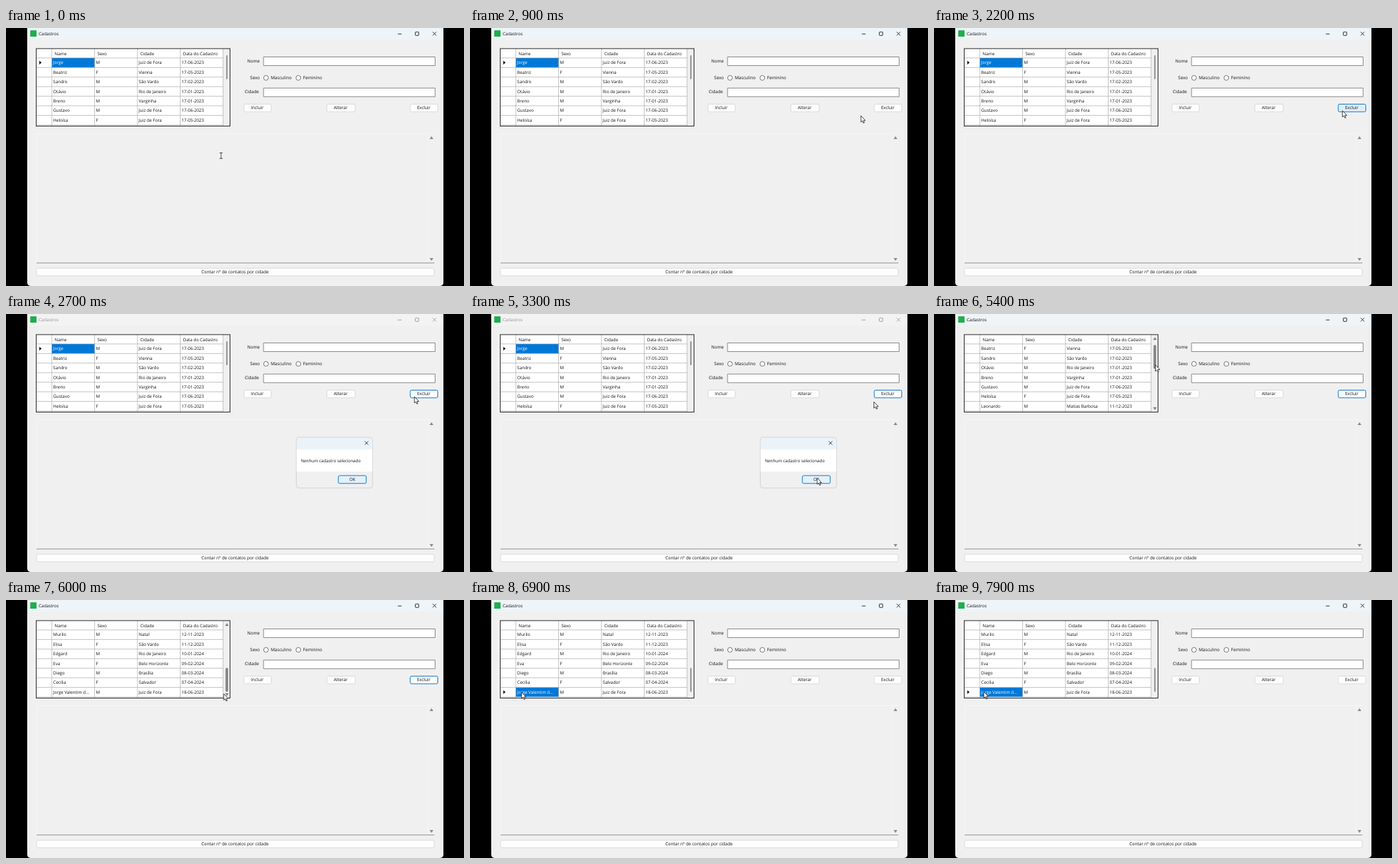
Recreate the animation shown at these times as an HTML page with a canvas. Size 690x388 px, loop 8000 ms.

```html
<!DOCTYPE html>
<html lang="pt">
<head>
<meta charset="utf-8">
<title>Cadastros</title>
<style>
html, body { margin: 0; width: 100%; height: 100%; overflow: hidden; background: #000; }
canvas { display: block; }
</style>
</head>
<body>
<canvas id="stage" width="690" height="388"></canvas>
<script>
const ctx = document.getElementById('stage').getContext('2d');
const LOOP = 8000, STEP = 100;
const FACE = '#f0f0f0', BLUE = '#0078d4', INK = '#111';
const ROW_H = 14.4, VISIBLE = 7;

const people = [
  ['Jorge', 'M', 'Juiz de Fora', '17-06-2023'],
  ['Beatriz', 'F', 'Vienna', '17-05-2023'],
  ['Sandro', 'M', 'São Vardo', '17-02-2023'],
  ['Otávio', 'M', 'Rio de Janeiro', '17-01-2023'],
  ['Breno', 'M', 'Varginha', '17-01-2023'],
  ['Gustavo', 'M', 'Juiz de Fora', '17-06-2023'],
  ['Heloísa', 'F', 'Juiz de Fora', '17-05-2023'],
  ['Leonardo', 'M', 'Matias Barbosa', '11-12-2023'],
  ['Nelson', 'M', 'Curitiba', '15-08-2023'],
  ['Sabrina', 'F', 'Recife', '14-09-2023'],
  ['Otto', 'M', 'Fortaleza', '13-10-2023'],
  ['Murilo', 'M', 'Natal', '12-11-2023'],
  ['Elisa', 'F', 'São Vardo', '11-12-2023'],
  ['Edgard', 'M', 'Rio de Janeiro', '10-01-2024'],
  ['Eva', 'F', 'Belo Horizonte', '09-02-2024'],
  ['Diego', 'M', 'Brasília', '08-03-2024'],
  ['Cecilia', 'F', 'Salvador', '07-04-2024'],
  ['Jorge Valentim d...', 'M', 'Juiz de Fora', '18-06-2023']
];
const MAX_SCROLL = people.length - VISIBLE;
const headers = ['Name', 'Sexo', 'Cidade', 'Data do Cadastro'];
const columns = [69, 133.5, 198, 262.5, 327];

// Pointer path: time, x, y
const path = [
  [0, 324, 192], [900, 589, 132], [1200, 615.3, 124.3], [2700, 615.3, 124.3],
  [2800, 608.5, 132], [3200, 523, 246.5], [4100, 523, 246.5], [4200, 521.5, 245.5],
  [4500, 312, 132], [4900, 333.5, 66], [5000, 333.5, 66], [5100, 333.5, 67.5],
  [5300, 333.5, 67.5], [5400, 333.5, 76.5], [5900, 328, 141], [6200, 328, 141],
  [6600, 79, 139], [7500, 75, 138], [LOOP, 75, 138]
];

function pointerAt(t) {
  const i = path.findIndex(p => p[0] > t);
  const [t0, x0, y0] = path[i - 1], [t1, x1, y1] = path[i];
  const k = (t - t0) / (t1 - t0);
  return { x: x0 + (x1 - x0) * k, y: y0 + (y1 - y0) * k };
}

function scrollAt(t, y) {
  if (t <= 5300) return 0;
  if (t >= 5900) return MAX_SCROLL;
  return Math.max(0, Math.min(MAX_SCROLL, Math.floor((y - 67.5) / 5.5)));
}

function fill(x, y, w, h, color) {
  ctx.fillStyle = color;
  ctx.fillRect(x, y, w, h);
}

function text(str, x, y, size = 6.5, color = INK, align = 'left') {
  ctx.font = `${size}px "Open Sans", sans-serif`;
  ctx.textAlign = align;
  ctx.fillStyle = color;
  ctx.fillText(str, x, y + 2.3);
}

function box(x, y, w, h, r, bg, edge, width = 1) {
  ctx.beginPath();
  ctx.roundRect(x, y, w, h, r);
  ctx.fillStyle = bg;
  ctx.fill();
  ctx.strokeStyle = edge;
  ctx.lineWidth = width;
  ctx.stroke();
}

function poly(points, color) {
  ctx.beginPath();
  points.forEach(([x, y]) => ctx.lineTo(x, y));
  ctx.closePath();
  ctx.fillStyle = color;
  ctx.fill();
}

function line(x0, y0, x1, y1, color, width = 1) {
  ctx.beginPath();
  ctx.moveTo(x0, y0);
  ctx.lineTo(x1, y1);
  ctx.strokeStyle = color;
  ctx.lineWidth = width;
  ctx.stroke();
}

function cross(x, y, r, color) {
  line(x - r, y - r, x + r, y + r, color, 0.8);
  line(x - r, y + r, x + r, y - r, color, 0.8);
}

function scrollArrow(x, y, dir, color) {
  poly([[x - 2.8, y + 2 * dir], [x + 2.8, y + 2 * dir], [x, y - 2.2 * dir]], color);
}

function button(label, x, y, w, state = '') {
  const edge = state ? BLUE : '#d2d2d2';
  box(x + 0.5, y + 0.5, w - 1, 11.5, 2, state === 'hover' ? '#e0eef9' : '#fdfdfd', edge, state ? 1 : 0.8);
  text(label, x + w / 2 - 0.5, y + 6, 6.6, INK, 'center');
}

function drawWindow(active) {
  fill(0, 0, 690, 388, '#000');
  ctx.save();
  ctx.beginPath();
  ctx.roundRect(32, -10, 627, 398, 5);
  ctx.clip();
  fill(32, 0, 627, 388, FACE);
  fill(32, 0, 627, 17.5, active ? '#eff4f9' : '#f3f3f3');
  ctx.restore();

  const color = active ? INK : '#929292';
  fill(36.5, 3.5, 9.5, 9.5, '#1fae4b');
  text('Cadastros', 49.3, 8.8, 6.45, color);
  line(590.3, 9, 596, 9, color, 0.9);
  box(616.6, 6, 5.2, 5.2, 0.8, 'transparent', color, 0.9);
  cross(645.6, 8.6, 2.8, color);
}

function drawTable(scroll, selected, hot) {
  ctx.save();
  ctx.beginPath();
  ctx.rect(45, 31, 293, 117);
  ctx.clip();
  fill(46, 31, 281, 116, '#fff');
  fill(327.5, 31, 10, 116, FACE);
  headers.forEach((h, i) => text(h, columns[i] + 4.3, 38.2, 6.45));

  for (let i = 0; i < VISIBLE; i++) {
    const index = scroll + i, top = 45 + i * ROW_H, mid = top + 7.1;
    const chosen = index === selected;
    if (chosen) {
      fill(69, top, 64.5, ROW_H, '#0078d7');
      poly([[50.2, mid - 2.8], [53.6, mid], [50.2, mid + 2.8]], '#111');
    }
    people[index].forEach((v, c) =>
      text(v, columns[c] + 2.1, mid, 6.45, chosen && c === 0 ? '#fff' : INK));
  }
  for (let i = 0; i <= VISIBLE; i++) {
    const y = 45 + i * ROW_H;
    line(46, y, 327, y, '#a6a6a6', 0.7);
  }
  columns.forEach(x => line(x, 31, x, 147, '#a6a6a6', 0.7));

  const thumbW = hot ? 4 : 1.8;
  ctx.beginPath();
  ctx.roundRect(332.7 - thumbW / 2, 41 + scroll * 5.55, thumbW, 36, thumbW / 2);
  ctx.fillStyle = '#858585';
  ctx.fill();
  if (hot) {
    scrollArrow(332.8, 37, 1, '#858585');
    scrollArrow(332.8, 142.3, -1, '#858585');
  }
  ctx.restore();
  ctx.strokeStyle = '#222';
  ctx.lineWidth = 1;
  ctx.strokeRect(45.5, 31, 292, 116.5);
}

function drawForm(deleteState) {
  text('Nome', 382.3, 49.2, 6.6, INK, 'right');
  text('Sexo', 382.3, 75, 6.6, INK, 'right');
  text('Cidade', 381, 96, 6.6, INK, 'right');
  box(388, 43.5, 258.5, 13, 0, '#fff', '#7a7a7a', 0.9);
  box(388, 90.3, 258.5, 13, 0, '#fff', '#7a7a7a', 0.9);
  [[391.7, 'Masculino'], [440.4, 'Feminino']].forEach(([x, label]) => {
    box(x - 3.6, 71.4, 7.2, 7.2, 3.6, '#fafafa', '#555', 0.8);
    text(label, x + 7.2, 75, 6.6);
  });
  button('Incluir', 358, 114, 42);
  button('Alterar', 483, 114, 43.5);
  button('Excluir', 608.5, 114, 42.5, deleteState);
}

function drawMemo() {
  line(46, 158.5, 646, 158.5, '#f6f6f6');
  line(46, 158.5, 46, 353, '#f6f6f6');
  line(636, 159, 636, 353, '#f5f5f5');
  line(46, 353.3, 645.5, 353.3, '#858585', 0.9);
  scrollArrow(641, 165, 1, '#8a8a8a');
  scrollArrow(641, 348, -1, '#8a8a8a');
  button('Contar nº de contatos por cidade', 45.5, 360.7, 600);
}

function drawDialog(alpha, scale) {
  ctx.save();
  ctx.globalAlpha = alpha;
  ctx.translate(494.7, 223.5);
  ctx.scale(scale, scale);
  ctx.translate(-494.7, -223.5);
  box(437.3, 185.3, 114.8, 76.4, 4, FACE, '#c4c8cc', 0.8);
  ctx.beginPath();
  ctx.roundRect(437.7, 185.7, 114, 18, [4, 4, 0, 0]);
  ctx.fillStyle = '#ebf2f8';
  ctx.fill();
  fill(437.7, 203.5, 114, 33.5, '#fff');
  cross(543.2, 194, 2.7, INK);
  text('Nenhum cadastro selecionado', 444.2, 220.3, 6.35);
  box(500.7, 243, 42, 11.8, 2, '#e5f0f8', BLUE, 1);
  text('OK', 521.7, 249, 6.5, INK, 'center');
  ctx.restore();
}

function drawArrow({ x, y }) {
  const shape = [[0, 0], [0, 9.6], [2.2, 7.6], [3.7, 11], [5.2, 10.4], [3.8, 7.1], [6.7, 7.1]];
  poly(shape.map(([dx, dy]) => [x + dx, y + dy]), '#fff');
  ctx.strokeStyle = '#111';
  ctx.lineWidth = 0.8;
  ctx.stroke();
}

function drawBeam({ x, y }) {
  [['#fff', 2], ['#222', 0.9]].forEach(([color, w]) => {
    line(x, y - 4.2, x, y + 4.2, color, w);
    line(x - 2.4, y - 4.2, x + 2.4, y - 4.2, color, w);
    line(x - 2.4, y + 4.2, x + 2.4, y + 4.2, color, w);
  });
}

function draw(t) {
  const p = pointerAt(t);
  const modal = t >= 2400 && t < 4100;
  let deleteState = '';
  if (t >= 1100 && t < 2400) deleteState = 'hover';
  else if (t >= 2400 && t < 6500) deleteState = 'focus';

  drawWindow(!modal);
  drawTable(scrollAt(t, p.y), t < 6500 ? 0 : people.length - 1, t >= 4700 && t < 6300);
  drawForm(deleteState);
  drawMemo();

  if (modal) drawDialog(t < 2500 ? 0.6 : 1, t < 2500 ? 0.96 : 1);
  else if (t === 4100) drawDialog(0.75, 0.98);
  else if (t === 4200) drawDialog(0.3, 0.94);

  // The pointer leaves a still image behind while the dialog is open
  if (t > 2800 && t < 4000) drawArrow({ x: 608.5, y: 132 });

  const overMemo = p.y > 158 && p.x > 46 && p.x < 636;
  if (overMemo && (t < 2400 || t >= 4200)) drawBeam(p);
  else drawArrow(p);
}

function tick(now) {
  draw(Math.floor((now % LOOP) / STEP) * STEP);
  requestAnimationFrame(tick);
}

ctx.textRendering = 'geometricPrecision';
draw(0);
requestAnimationFrame(tick);
</script>
</body>
</html>
```
